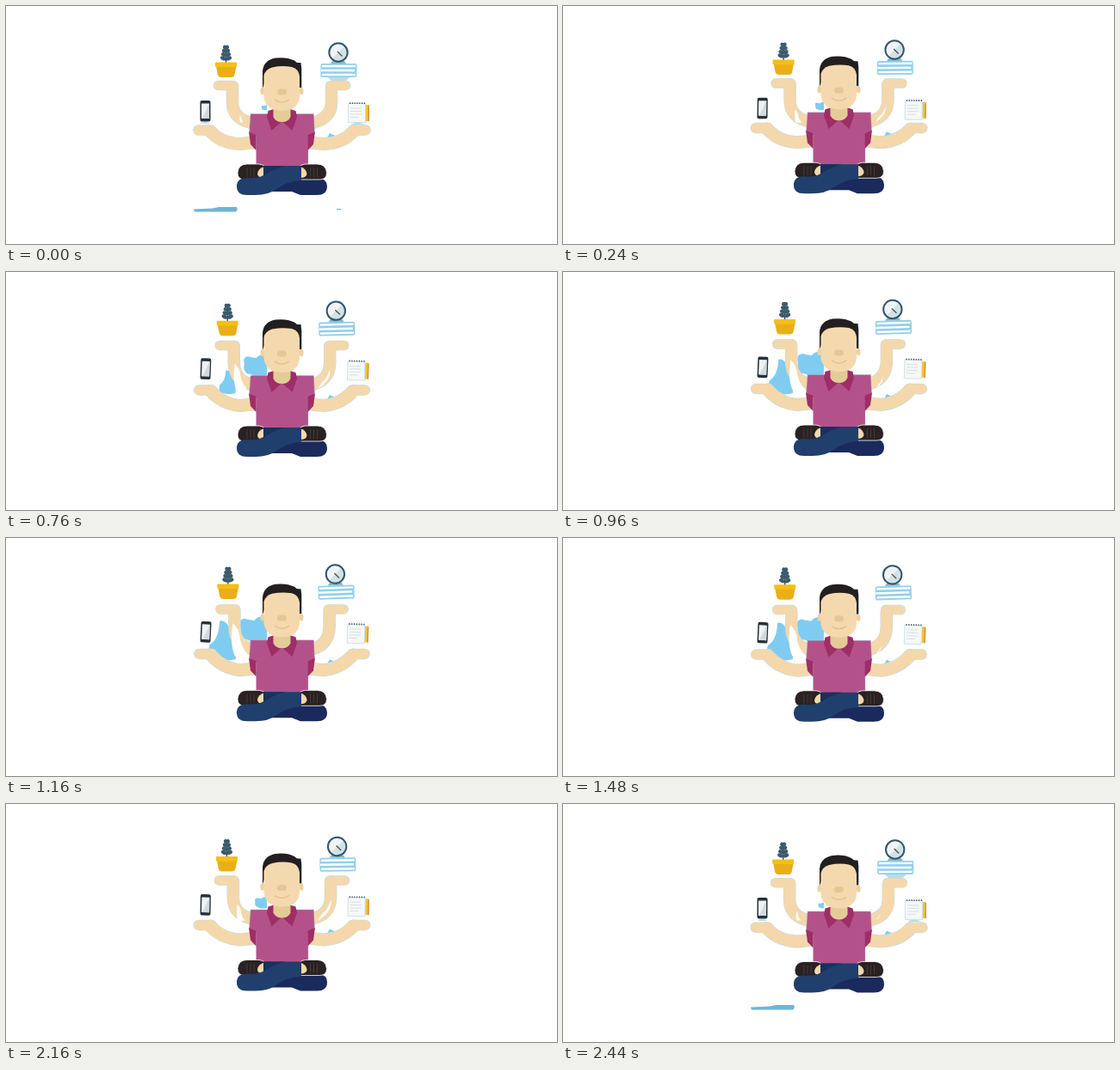
An HTML page that plays this animation: 640 px wide and 277 px high, repeating every 2520 ms.

```html
<!DOCTYPE html>
<html lang="en">
<head>
<meta charset="utf-8">
<title>Multitasking meditation</title>
<style>
  html, body { margin: 0; width: 100%; height: 100%; overflow: hidden; background: #fff; }
  svg { display: block; width: 100vw; height: 100vh; }
  .arm, .halo { fill: none; stroke: #f4d8ab; stroke-linecap: round; stroke-linejoin: round; }
  .halo { stroke: #bcdbe8; }
</style>
</head>
<body>
<svg viewBox="0 0 640 277">
  <g class="rest" fill="#6fb4d8">
    <path d="M218 236.500L240 235.500L247 234H268Q270 237 267 239.500H219Z"/>
    <path id="dash" d="M384 236h5v1.200h-5z"/>
  </g>
  <g fill="#80ccf1">
    <path id="cloud" d="M303 122H286Q283 118 277 118Q271 114 273 105Q270 96 278 95Q285 97 289 97Q292 92 303 92Z"/>
    <path id="wisp" d="M248 96Q256 94 260 107Q268 120 267 141Q250 146 234 137L236 124Q247 118 248 96Z"/>
    <path id="chip" d="M372 155L376 148L387 153Z"/>
  </g>

  <g id="arm"></g>
  <use href="#arm" transform="translate(641 0) scale(-1 1)"/>
  <g fill="#fff">
    <path id="gapL" d="M263 98Q271 104 272 118Q275 130 282 136L266 138Q259 125 263 98Z"/>
    <path id="gapR" d="M379 109Q381 124 362 136Q366 127 373 122Z"/>
  </g>

  <g id="body">
    <!-- shirt -->
    <path fill="#b3528a" stroke="#a9c4d6" stroke-width=".4" d="M284 125.500H357.500L358.500 147L351 152V187H290.500V152L282.500 147Z"/>
    <g id="side" fill="#9f2d67">
      <path d="M282 146.500L290.500 150V168L284 161Z"/>
      <path d="M304.500 122L311 120L320.500 134L308.500 145L303 129Z"/>
    </g>
    <use href="#side" transform="translate(641 0) scale(-1 1)"/>
    <!-- legs -->
    <path fill="#1b2a5c" d="M300 200L343 198Q352 203 362 200Q373 201 373 210Q373 220 361 220H342L332 216H308L296 219Z"/>
    <g id="shoe">
      <path fill="#292122" stroke="#fff" stroke-width=".8" d="M303 202H277Q269 202 269 194Q270 184 280 184H294Q302 185 303 192Z"/>
      <path stroke="#51403d" stroke-width=".8" d="M280 188v11M284 188v11M288 188v11"/>
      <path fill="#f4d8ab" d="M300 187Q293 189 292 195Q292 200 300 200Z"/>
    </g>
    <use href="#shoe" transform="translate(641.500 0) scale(-1 1)"/>
    <path fill="#203f6c" d="M299 186H343V203Q326 204 314 213Q305 220 290 220H280Q268 220 268 210Q268 200 280 200Q292 201 299 197Z"/>
    <path fill="#1a315c" d="M299 186H324Q309 190 299 198Z"/>
    <!-- head -->
    <path fill="#e3cc97" d="M310.500 116H330.500V129Q328 135 320.500 135Q313 135 310.500 129Z"/>
    <path fill="#0d2c40" d="M330 66H342.500L343.300 73V95H338Z"/>
    <path fill="#231f20" d="M298 96V76Q299 63 313 60.500Q326 59 335 63.500L338 66Q342 66 342.500 72L342 94L330 80H304Z"/>
    <ellipse cx="297.800" cy="99" rx="2.300" ry="4.200" fill="#efd09f"/>
    <ellipse cx="343.200" cy="99" rx="2.300" ry="4.200" fill="#efd09f"/>
    <path fill="#f5d9ae" d="M299.500 91V81Q301 74 309 71.500Q321 69 332 71Q340 73 341 82V106Q339 122 320.500 122Q302 122 299.500 106Z"/>
    <rect x="315" y="96.500" width="11" height="7" rx="3.500" fill="#e3c796"/>
    <path fill="none" stroke="#dfbf8b" stroke-width="1.200" d="M312 109Q320.500 115 329 109"/>
  </g>

  <g id="plant">
    <path stroke="#35505f" stroke-width="1.500" d="M255.500 46V67"/>
    <g id="leaves" fill="#3b5b6b"></g>
    <path fill="#eaaf18" d="M244 70H267.500L265.500 80Q265 83 261 83H250Q247 83 246 80Z"/>
    <rect x="243" y="65.500" width="25" height="5.500" rx="1" fill="#f5bf18"/>
  </g>

  <g id="clock">
    <path class="rest" fill="#b9dcea" d="M374 83H399L395 87H378Z"/>
    <rect x="365.500" y="67" width="42" height="16" rx="2" fill="#92cfea"/>
    <path stroke="#fff" stroke-width="2.400" d="M367 70H406M366 75H405M367 80H406"/>
    <path fill="#85b7cf" d="M379 64h14l2 3h-18z"/>
    <circle cx="386" cy="54" r="10.700" fill="#f0f3f4"/>
    <path fill="#d3e2e5" d="M393.500 46.500A10.600 10.600 0 0 1 378.500 61.500Z"/>
    <circle cx="386" cy="54" r="10.700" fill="none" stroke="#34566d" stroke-width="2"/>
    <path stroke="#4b5054" stroke-width="1.300" d="M385 53L390.500 58.500"/>
  </g>

  <g id="phone">
    <path class="rest" fill="#b7dced" d="M226 137Q231 133 238 137Z"/>
    <rect x="225.500" y="110" width="12" height="24.500" rx="2" fill="#253039"/>
    <rect x="227" y="113.500" width="9" height="17.500" fill="#eff1f2"/>
    <path fill="#d3dadd" d="M236 113.500V131H228Z"/>
  </g>

  <g id="pad">
    <path class="rest" fill="#b7dced" d="M400 138Q408 133 417 138Z"/>
    <rect x="417.500" y="115" width="4.500" height="19" rx="1" fill="#f0c53c"/>
    <path fill="#dc913a" d="M420.500 116h1.500v18h-1.500z"/>
    <rect x="397.500" y="113.500" width="20" height="22" fill="#f6f8f7" stroke="#bfdde9" stroke-width=".8"/>
    <path stroke="#46545d" stroke-width="1.800" stroke-dasharray="1.200 1.600" d="M399 113.200H417"/>
    <path stroke="#cfd9db" stroke-width=".8" d="M400 119h13M400 122.500h13M400 126h13M400 129.500h10"/>
  </g>
</svg>

<script>
const LOOP = 2520, STEP = 40;
const WIDTHS = { hand: 10.5, upper: 13.5, palm: 11.5, lower: 14 };
const $ = id => document.getElementById(id);
const set = (el, attrs) => {
  for (const k in attrs) el.setAttribute(k, attrs[k]);
  return el;
};
const add = (parent, tag, attrs) =>
  parent.appendChild(set(document.createElementNS("http://www.w3.org/2000/svg", tag), attrs));

// Leaves in pairs along the stem, wider towards the pot.
for (let i = 0; i < 4; i++)
  for (const side of [-1, 1]) {
    const cx = 255.5 + side * (1 + i * .75), cy = 48 + i * 4.3;
    add($("leaves"), "ellipse", {
      cx, cy, rx: 2.6 + i * .3, ry: 2.3, transform: `rotate(${-25 * side} ${cx} ${cy})`
    });
  }

const strokes = [];
for (const [cls, extra] of [["halo", 1], ["arm", 0]])
  for (const part in WIDTHS)
    strokes.push([add($("arm"), "path", { class: cls, "stroke-width": WIDTHS[part] + extra }), part]);

const clamp = v => Math.max(0, Math.min(1, v));
const move = (id, x, y, more = "") =>
  set($(id), { transform: `translate(${x} ${y}) ${more}` });
const grow = (id, s, x, y) => move(id, x * (1 - s), y * (1 - s), `scale(${s})`);

// Height of the float: 0 at rest, 1 at the top.
function lift(t) {
  const u = t / LOOP;
  return (1 - Math.abs(1 - 2 * u) + Math.sin(Math.PI * u)) / 2;
}

function draw(t) {
  const p = lift(t), ease = p * p * (3 - 2 * p);
  const b = -7 * p, h = -10 * p, x = 2.5 * p;
  const paths = {
    hand: `M${246.5 + x} ${92.5 + h}H${264 + x}`,
    upper: `M${263 + x} ${94 + h}V${112 + h}Q${263 + x} ${133 + b} 290 ${137 + b}`,
    palm: `M${223.5 + p} ${144.5 + h}H${238 + p}`,
    lower: `M${237 + p} ${145.5 + h}Q${250 + p} ${160 + b - 2 * p} 272 ${160.5 + b}L287 ${159 + b}`
  };
  for (const [el, part] of strokes) set(el, { d: paths[part] });

  move("body", 0, b);
  move("plant", x, -12.5 * p);
  move("clock", -3 * p, -12.5 * p, `rotate(${-2 * p} 386 75)`);
  move("phone", .6 * p, -13.5 * p, `rotate(${3 * p} 231.5 122)`);
  move("pad", -p, -13.5 * p, `rotate(${2 * p} 408 124)`);
  move("chip", 0, b);

  grow("cloud", .2 + .85 * ease, 303, 121);
  grow("wisp", clamp(2 * ease - 1), 266, 141);
  grow("gapL", .2 + .8 * p, 274, 135);
  grow("gapR", Math.sin(Math.PI * p), 365, 134);

  for (const el of document.querySelectorAll(".rest"))
    el.style.display = p < .1 ? "" : "none";
  $("dash").style.display = p ? "none" : "";
}

const start = performance.now();
function tick() {
  const t = (performance.now() - start) % LOOP;
  draw(Math.min(Math.floor(t / STEP) * STEP, LOOP - 2 * STEP));
  requestAnimationFrame(tick);
}
draw(0);
requestAnimationFrame(tick);
</script>
</body>
</html>
```
